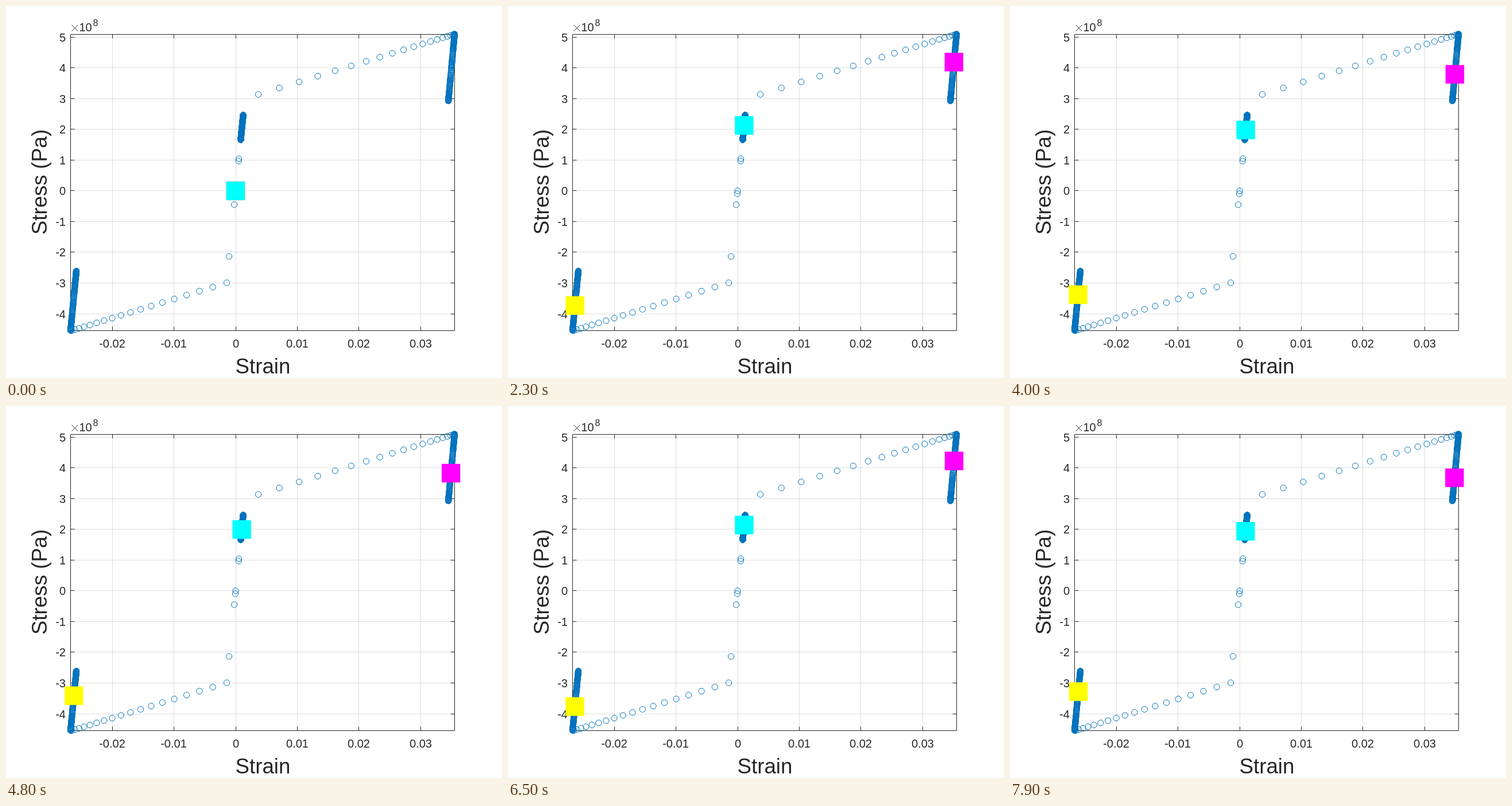
An HTML page for the animation above (8000 ms loop, 864 by 648 pixels).

```html
<!DOCTYPE html>
<html lang="en">
<head>
<meta charset="utf-8">
<title>Stress and strain</title>
<style>
html, body { margin: 0; width: 100%; height: 100%; overflow: hidden; background: #fff; }
svg { display: block; width: 864px; height: 648px; font-family: "Liberation Sans", Arial, sans-serif; }
text { fill: #262626; }
.grid { stroke: #262626; stroke-opacity: .15; fill: none; }
.axis { stroke: #262626; fill: none; }
circle { fill: none; stroke: #0072bd; }
</style>
</head>
<body>
<svg id="stage" viewBox="0 0 864 648"></svg>
<script>
const stage = document.getElementById('stage');

function add(name, attrs, label) {
  const el = document.createElementNS('http://www.w3.org/2000/svg', name);
  for (const key in attrs) el.setAttribute(key, attrs[key]);
  if (label !== undefined) el.textContent = label;
  stage.append(el);
  return el;
}
const path = (cls, d) => add('path', { class: cls, d });
const text = (x, y, size, anchor, label, more) =>
  add('text', { x, y, 'font-size': size, 'text-anchor': anchor, ...more }, label);

// Axes
const left = 112.5, right = 781.5, upper = 49.5, lower = 565.5;
const snap = v => Math.floor(v) + .5;
for (let i = -2; i <= 3; i++) {
  const x = snap(400.2 + i * 107.35);
  path('grid', `M${x} ${upper}V${lower}`);
  path('axis', `M${x} ${lower}v-7M${x} ${upper}v7`);
  text(i < 0 ? x - .5 : x, 595, 20, 'middle', i ? (i / 100).toFixed(2) : '0');
}
for (let i = -4; i <= 5; i++) {
  const y = snap(321.8 - i * 53.55);
  path('grid', `M${left} ${y}H${right}`);
  path('axis', `M${left} ${y}h7M${right} ${y}h-7`);
  text(104, y + 7.5, 20, 'end', i);
}
path('axis', `M${left} ${upper}H${right}V${lower}H${left}Z`);
path('axis', 'M114.5 33l11 11m0 -11l-11 11');
text(127.5, 44, 20, 'start', '10');
text(151.5, 35, 16, 'start', '8');
text(447.5, 640, 36.7, 'middle', 'Strain');
text(0, 0, 36.7, 'middle', 'Stress (Pa)', { transform: 'translate(71 306.5) rotate(-90)' });

// Point on the elastic line, given its height above zero stress
const elastic = h => [400 + h * .1, 322 - h];

// Each place in the material: its first loading by sample i, then its cycle for c from -1 to 1
const tension = {
  color: '#f0f',
  ramp(i) {
    if (i < 2) return elastic(56 * i);
    const d = 342 * ((21 - i) / 19) ** 2.1;
    return [781.5 - d, 49 + .307 * d];
  },
  cycle: c => [776 + 5.4 * c, 107 - 58 * c]
};
const compression = {
  color: '#ff0',
  ramp(i) {
    if (i < 3) return elastic(-24 * i ** 2.25);
    const d = 272 * ((21 - i) / 18) ** 1.63;
    return [112.5 + d, 566 - .3085 * d];
  },
  cycle: c => [117.5 - 5 * c, 513.5 + 51.5 * c]
};
const core = {
  color: '#0ff',
  ramp: i => elastic(132 * (1 - Math.exp(-i / 4))),
  cycle: c => elastic(110.5 + 21.5 * c)
};
const places = [tension, compression, core];
const load = step => Math.cos(1.41 + 1.1305 * (step - 23));

// Sample rings
const ring = ([cx, cy]) => add('circle', { cx, cy, r: 5.1 });
for (let i = 0; i <= 20; i++) {
  ring(tension.ramp(i));
  if (i) ring(compression.ramp(i));
}
ring(elastic(-5));
ring(core.ramp(2));
for (const { cycle } of places)
  for (let i = 0; i < 150; i++) ring(cycle(load(11 + i / 2)));

// Moving markers
const size = 32.4;
const markers = places.map(p => add('rect', { width: size, height: size, fill: p.color }));

function draw(now) {
  const step = Math.floor(now % 8000 / 100);
  places.forEach((place, n) => {
    const [x, y] = step <= 10 ? place.ramp(2 * step) : place.cycle(load(step));
    markers[n].setAttribute('x', x - size / 2);
    markers[n].setAttribute('y', y - size / 2);
  });
  requestAnimationFrame(draw);
}
draw(0);
</script>
</body>
</html>
```
